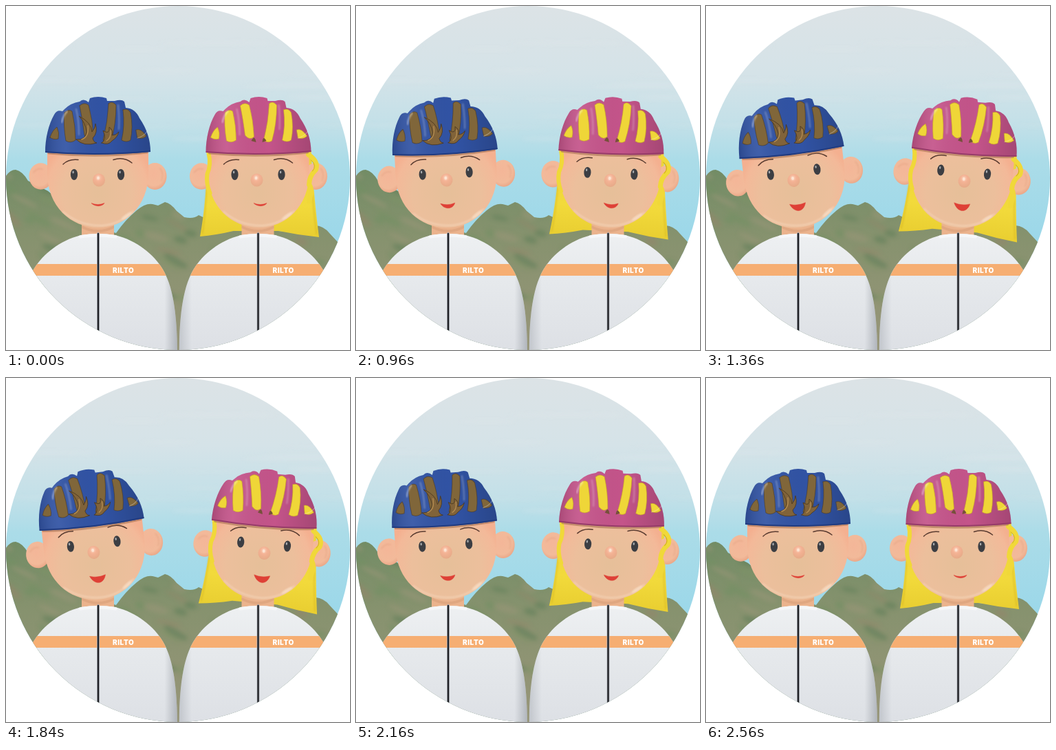
Write an HTML page that moves like this. It is 500 px wide and 500 px high and loops after 3000 ms.

```html
<!DOCTYPE html>
<html lang="en">
<head>
<meta charset="utf-8">
<title>Two cyclists</title>
<style>
  html, body { margin: 0; width: 100%; height: 100%; overflow: hidden; background: #fff; }
  svg { display: block; width: 100vw; height: 100vh; }
  .tag { font: 900 10px Inter, Arial, sans-serif; letter-spacing: .5px; fill: #fff; }
  .line { fill: none; stroke-linecap: round; stroke-linejoin: round; }
</style>
</head>
<body>
<svg id="stage" viewBox="0 0 500 500">
  <defs>
    <clipPath id="disc"><circle cx="250" cy="250" r="250"/></clipPath>
    <linearGradient id="sky" x1="0" y1="0" x2="0" y2="330" gradientUnits="userSpaceOnUse">
      <stop offset="0" stop-color="#dce3e6"/>
      <stop offset=".3" stop-color="#d5e3e8"/>
      <stop offset=".52" stop-color="#c3e0e8"/>
      <stop offset=".68" stop-color="#abdce8"/>
      <stop offset="1" stop-color="#9dd8e9"/>
    </linearGradient>
    <linearGradient id="land" x1="0" y1="235" x2="0" y2="480" gradientUnits="userSpaceOnUse">
      <stop offset="0" stop-color="#728c65"/>
      <stop offset=".4" stop-color="#86926e"/>
      <stop offset="1" stop-color="#969578"/>
    </linearGradient>
    <radialGradient id="skin" cx="133" cy="272" r="84" gradientUnits="userSpaceOnUse">
      <stop offset="0" stop-color="#e6bf99"/>
      <stop offset=".6" stop-color="#ecbf9c"/>
      <stop offset=".88" stop-color="#f3b999"/>
      <stop offset="1" stop-color="#f4b090"/>
    </radialGradient>
    <radialGradient id="ear" cx=".45" cy=".4" r=".6">
      <stop offset="0" stop-color="#f4b698"/>
      <stop offset=".75" stop-color="#f2ba9a"/>
      <stop offset="1" stop-color="#eba888"/>
    </radialGradient>
    <radialGradient id="nose" cx=".45" cy=".32" r=".68">
      <stop offset="0" stop-color="#fbd7c1"/>
      <stop offset=".4" stop-color="#f4b294"/>
      <stop offset="1" stop-color="#e6aa88"/>
    </radialGradient>
    <linearGradient id="shirt" x1="0" y1="330" x2="0" y2="500" gradientUnits="userSpaceOnUse">
      <stop offset="0" stop-color="#eef0f2"/>
      <stop offset=".4" stop-color="#e6e9ec"/>
      <stop offset="1" stop-color="#dde0e5"/>
    </linearGradient>
    <linearGradient id="fold" x1="19" y1="0" x2="249" y2="0" gradientUnits="userSpaceOnUse">
      <stop offset="0" stop-color="#6d747d" stop-opacity=".25"/>
      <stop offset=".08" stop-color="#6d747d" stop-opacity="0"/>
      <stop offset=".92" stop-color="#6d747d" stop-opacity="0"/>
      <stop offset="1" stop-color="#6d747d" stop-opacity=".4"/>
    </linearGradient>
    <linearGradient id="shade" x1="57" y1="0" x2="210" y2="0" gradientUnits="userSpaceOnUse">
      <stop offset="0" stop-color="#000" stop-opacity=".14"/>
      <stop offset=".2" stop-color="#fff" stop-opacity=".07"/>
      <stop offset=".6" stop-color="#000" stop-opacity="0"/>
      <stop offset="1" stop-color="#000" stop-opacity=".16"/>
    </linearGradient>
    <linearGradient id="gold" x1="0" y1="215" x2="0" y2="340" gradientUnits="userSpaceOnUse">
      <stop offset="0" stop-color="#ecd23b"/>
      <stop offset=".6" stop-color="#f2da3b"/>
      <stop offset="1" stop-color="#e8cd30"/>
    </linearGradient>
    <clipPath id="torso"><path d="M109 333Q134 329 159 333C190 341 214 360 228 383C241 405 249 440 249 510H19C19 440 27 405 40 383C54 360 78 341 109 333Z"/></clipPath>
    <clipPath id="ground"><path d="M0 247Q6 238 14 238Q24 240 32 254L61 269Q84 286 104 315L160 330Q174 310 190 297Q203 286 213 288L221 290L231 285Q240 287 248 298L259 307Q273 310 280 304L320 322L440 330L450 319Q462 320 470 330L482 343L500 360V500H0Z"/></clipPath>
    <filter id="soft"><feGaussianBlur stdDeviation="3"/></filter>
    <filter id="glow"><feGaussianBlur stdDeviation="1.3"/></filter>
  </defs>
  <g id="scene" clip-path="url(#disc)"></g>
</svg>
<script>
const STEP = 40, LOOP = 3000, MOVES = 19;

const riders = [
  { x: 0, body: 0, tilt: -6.5, pivot: 291, shell: '#3153a4', rim: '#203b80', vent: '#80663a', deep: '#4c3b26',
    nose: [135, 253], mouth: [133.5, 288], eyeGo: [.3, -4.3], noseGo: [-3.3, 0], mouthGo: [0, .5] },
  { x: 233.5, body: 232.5, tilt: 5, pivot: 306, shell: '#c4548a', rim: '#963b69', vent: '#efd638', deep: '#c3a227', long: true,
    nose: [131, 253], mouth: [136, 288], eyeGo: [3, -4], noseGo: [6.5, 1], mouthGo: [1, 0] }
];

// Small seeded generator for the mottled hills and the sky streaks
let seed = 11;
const rnd = (a, b) => {
  seed = seed * 16807 % 2147483647;
  return a + (b - a) * seed / 2147483647;
};
const repeat = (n, make) => Array.from({ length: n }, make).join('');

const path = (d, fill, more = '') => `<path d="${d}" fill="${fill}" ${more}/>`;
const line = (d, color, w, more = '') => `<path class="line" d="${d}" stroke="${color}" stroke-width="${w}" ${more}/>`;
const oval = (x, y, rx, ry, fill, more = '') => `<ellipse cx="${x}" cy="${y}" rx="${rx}" ry="${ry}" fill="${fill}" ${more}/>`;

function backdrop() {
  const tones = ['#5f7e58', '#729063', '#999678', '#94856b', '#7f9466'];
  return `<rect width="500" height="500" fill="url(#sky)"/>
    <g filter="url(#soft)" opacity=".22">${repeat(22, () =>
      oval(rnd(0, 500), rnd(50, 205), rnd(30, 90), rnd(1, 3), '#e8ebed'))}</g>
    <g clip-path="url(#ground)"><rect y="230" width="500" height="270" fill="url(#land)"/>
    <g filter="url(#soft)" opacity=".55">${repeat(85, () => {
      const x = rnd(0, 500), y = rnd(245, 440), turn = rnd(5, 45);
      return oval(x, y, rnd(7, 22), rnd(2, 6), tones[Math.floor(rnd(0, 5))], `transform="rotate(${turn} ${x} ${y})"`);
    })}</g></g>`;
}

function body(r) {
  return `<g transform="translate(${r.body})">
    <path d="M110 300H157V336H110Z" fill="#ebb38d"/>
    <path d="M110 319Q134 331 157 319V323Q134 335 110 323Z" fill="#cf936e" opacity=".4"/>
    ${line('M113 325H128', '#fff0dc', 4, 'opacity=".8" filter="url(#glow)"')}
    <g clip-path="url(#torso)">
      <rect x="10" y="325" width="245" height="180" fill="url(#shirt)"/>
      ${line('M108 335Q134 331 159 335', '#f6f7f9', 5)}
      <rect x="10" y="375" width="240" height="17" fill="#f6ae72"/>
      <rect x="10" y="390" width="245" height="115" fill="url(#fold)"/>
    </g>
    ${line('M134 331V500', '#b5b8c0', 4)}${line('M134 331V500', '#202126', 2.4)}
    <text class="tag" x="155" y="387.5">RILTO</text>
  </g>`;
}

const dome = 'M57 213C57 192 62 172 70 158Q74 150 82 153L85 150Q94 141 107 139L110 137Q115 135 120 140L122 134Q134 130 146 134L147 138L158 138Q168 135 172 139L174 148Q188 149 194 163C205 179 210 195 210 212Q134 219 57 213Z';
const vents = [
  'M64 191Q67 181 74 176Q78 184 76 193Q69 195 64 191Z',
  'M85 155Q91 149 96 153Q101 174 101 195Q94 200 87 196Q83 173 85 155Z',
  'M107 145Q113 139 120 144Q126 166 127 190Q121 196 114 188Q111 164 107 145Z',
  'M149 142Q154 137 160 144Q160 171 153 196Q147 200 141 195Q148 168 149 142Z',
  'M170 151Q177 148 181 155Q185 176 181 195Q175 199 168 195Q173 174 170 151Z',
  'M189 180Q196 177 204 189Q199 194 191 192Z'
];
const flames = [
  'M102 194Q116 195 117 183Q116 170 106 160Q124 169 125 183Q130 177 130 171Q134 184 126 192Q127 198 132 199Q113 205 102 194Z',
  'M139 199Q147 194 141 181Q151 188 150 176Q157 181 154 188Q160 188 164 183Q162 191 154 196Q149 203 139 199Z'
];

function helmet(r) {
  const holes = vents.map(d => path(d, r.vent) + line(d, r.deep, 1, 'opacity=".6"')).join('');
  const extra = r.long
    ? path('M123 196Q128 186 130 198ZM139 198Q140 187 145 196Z', '#76503a')
    : flames.map(d => path(d, '#816339') + line(d, '#49371f', .8)).join('')
      + line('M110 194Q121 190 119 174M146 196Q153 192 152 181', '#b28b50', 1.4);
  return line('M62 214Q134 221 205 213', '#a57051', 3, 'opacity=".6"')
    + path(dome, r.shell) + path(dome, 'url(#shade)') + holes + extra
    + line('M58 212Q134 218.5 209 211', r.rim, 2)
    + line('M81 169Q83 159 89 153', '#fff', 2, 'opacity=".5" filter="url(#glow)"')
    + line('M102 150Q106 166 106 187M163 144Q165 160 164 179', '#fff', 2.4, 'opacity=".24" filter="url(#glow)"')
    + line('M191 192Q201 189 205 182', '#fff', 1.3, 'opacity=".28"');
}

// Long hair hangs behind the neck and shirt, so it is a separate layer
function hair() {
  return `<g class="tilt">${path('M60 210Q58 284 48.5 335Q72 333 97 327H163Q192 333 221.5 336Q214 280 210 210Z', 'url(#gold)')}
    ${line('M58 265Q56 306 52 330M212 275Q215 310 218 331', '#caa818', 2, 'opacity=".4" filter="url(#glow)"')}</g>`;
}

function head(r) {
  const face = 'M60 207L60 243C60 291 94 322 134 322C173 322 207 291 207 243L207 207Z';
  return `<g class="tilt">
    ${oval(50.5, 247.5, 17, 19.3, 'url(#ear)')}${oval(216.5, 247.5, 17, 19.5, 'url(#ear)')}
    ${line('M40 242Q45 235 53 237M224 236Q230 244 226 254', '#d58d6e', 1.5, 'opacity=".35" filter="url(#glow)"')}
    ${path(face, 'url(#skin)')}
    ${line('M83 299Q107 320 140 319Q166 317 185 298', '#fff0dd', 2, 'opacity=".35" filter="url(#glow)"')}
    ${oval(175, 305, 9, 2.5, '#fff5e5', 'opacity=".4" transform="rotate(-36 175 305)" filter="url(#glow)"')}
    ${r.long ? line('M61 214Q65 231 59 244Q57 258 63 272', '#f0d839', 6)
      + line('M206 216Q221 226 217 238Q207 247 207 260Q213 265 207 284', '#f0d839', 7)
      + line('M210 224Q219 232 212 240', '#d2ad20', 1) : ''}
    <g class="eyes">
      ${[[99, 245], [167, 245]].map(([x, y]) => oval(x, y, 5.1, 8, '#3c3e43') + oval(x - 1.4, y - 3.5, 1.2, 2, '#a9adb0')).join('')}
      ${line('M83 230Q91 222 105 223.5M156 223.5Q171 218.5 183 228', '#593b30', 1.5)}
    </g>
    <g class="nose">${oval(...r.nose, 9, 9.5, 'url(#nose)')}${oval(r.nose[0] - 1, r.nose[1] - 3, 2, 2.5, '#fff1e5', 'opacity=".6"')}</g>
    <path class="mouth" fill="#de4036" stroke="#de4036" stroke-width=".5" stroke-linejoin="round"/>
    ${helmet(r)}
  </g>`;
}

const scene = document.getElementById('scene');
scene.innerHTML = backdrop() + riders.map(r => {
  const place = part => `<g transform="translate(${r.x})">${part}</g>`;
  return `<g class="rider">${r.long ? place(hair()) : ''}${body(r)}${place(head(r))}</g>`;
}).join('');

const parts = [...scene.querySelectorAll('.rider')].map(g => ({
  tilts: g.querySelectorAll('.tilt'),
  eyes: g.querySelector('.eyes'),
  nose: g.querySelector('.nose'),
  mouth: g.querySelector('.mouth')
}));

const ease = p => p * p * (3 - 2 * p);
const clamp = v => Math.max(0, Math.min(1, v));

// Tilt amount: out from 600 ms, back from 1800 ms
function lean(ms) {
  const n = Math.floor(ms % LOOP / STEP);
  return ease(clamp((n - 15) / MOVES)) - ease(clamp((n - 45) / MOVES));
}

// Thin smile at k = 0, wide filled smile at k = 1
function smile([x, y], k) {
  const w = 9.5 + 2 * k, top = y - 1.5, low = y + 4 + 8.5 * k;
  return `M${x - w} ${top}Q${x} ${y + 2.5} ${x + w} ${top}C${x + w * .7} ${low} ${x - w * .5} ${low} ${x - w} ${top}Z`;
}

function render(ms) {
  const k = lean(ms);
  const move = (el, [x, y]) => el.setAttribute('transform', `translate(${x * k} ${y * k})`);
  riders.forEach((r, i) => {
    const p = parts[i];
    p.tilts.forEach(el => el.setAttribute('transform', `rotate(${r.tilt * k} 133.5 ${r.pivot})`));
    move(p.eyes, r.eyeGo);
    move(p.nose, r.noseGo);
    move(p.mouth, r.mouthGo);
    p.mouth.setAttribute('d', smile(r.mouth, k));
  });
}

function tick(now) {
  render(now);
  requestAnimationFrame(tick);
}
render(0);
requestAnimationFrame(tick);
</script>
</body>
</html>
```
